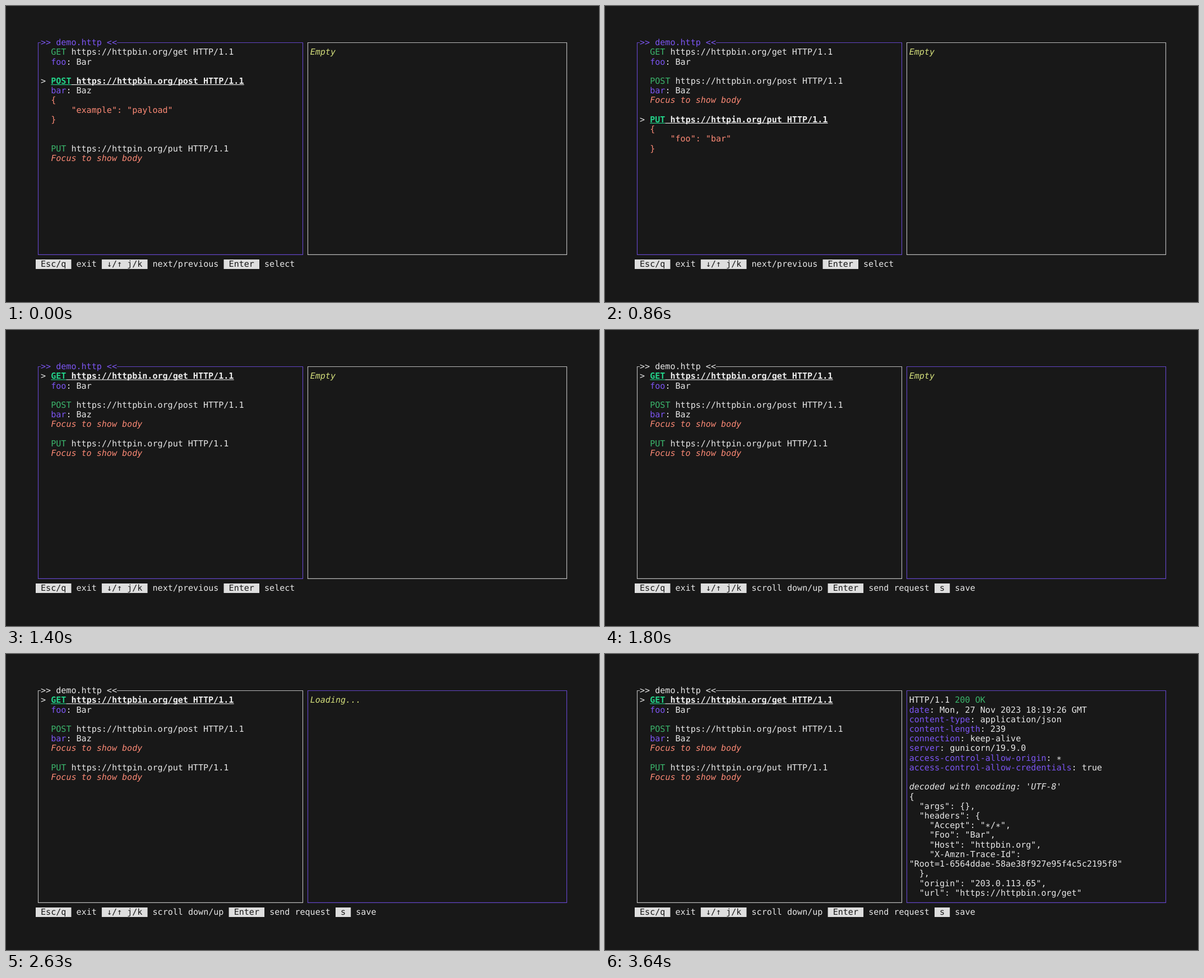
An HTML page for the animation above (4120 ms loop, 1058x529 px).

```html
<!DOCTYPE html>
<html lang="en">
<head>
<meta charset="utf-8">
<title>HTTP client in a terminal</title>
<style>
html, body { margin: 0; width: 100%; height: 100%; overflow: hidden; background: #181818; }
svg { display: block; width: 100%; height: 100%; }
text {
  font: 15.062px "DejaVu Sans Mono", monospace;
  font-variant-ligatures: none;
  text-rendering: geometricPrecision;
  white-space: pre;
  fill: #e8e8e8;
}
.green { fill: #3bb56c; }
.purple { fill: #7c55f3; }
.coral { fill: #fb8975; }
.yellow { fill: #d5e07c; }
.dark { fill: #181818; }
.italic { font-style: italic; }
.bold { font-weight: bold; fill: #efefef; }
.bold.green { fill: #23d48a; }
</style>
</head>
<body>
<svg id="screen" viewBox="0 0 1058 529" xmlns="http://www.w3.org/2000/svg"></svg>
<script>
const screen = document.getElementById('screen');
const LEFT = 53, CELL = 9.068, TOP = 56.9, ROW = 17.225, BASE = 13.2;
const LOOP = 4120;
const ACTIVE = '#6245c4', IDLE = '#b9b9b9';

const scenes = [
  { at: 0, selected: 1 },
  { at: 400, selected: 2 },
  { at: 1160, selected: 1 },
  { at: 1400, selected: 0 },
  { at: 1800, selected: 0, right: true, response: 'empty' },
  { at: 2200, selected: 0, right: true, response: 'loading' },
  { at: 2920, selected: 0, right: true, response: 'done' }
];

const requests = [
  { method: 'GET', url: 'https://httpbin.org/get', header: ['foo', 'Bar'] },
  { method: 'POST', url: 'https://httpbin.org/post', header: ['bar', 'Baz'],
    body: ['{', '    "example": "payload"', '}', ''] },
  { method: 'PUT', url: 'https://httpin.org/put', body: ['{', '    "foo": "bar"', '}'] }
];

const headers = [
  ['date', 'Mon, 27 Nov 2023 18:19:26 GMT'],
  ['content-type', 'application/json'],
  ['content-length', '239'],
  ['connection', 'keep-alive'],
  ['server', 'gunicorn/19.9.0'],
  ['access-control-allow-origin', '*'],
  ['access-control-allow-credentials', 'true']
];

const payload = `{
  "args": {},
  "headers": {
    "Accept": "*/*",
    "Foo": "Bar",
    "Host": "httpbin.org",
    "X-Amzn-Trace-Id":
"Root=1-6564ddae-58ae38f927e95f4c5c2195f8"
  },
  "origin": "203.0.113.65",
  "url": "https://httpbin.org/get"`.split('\n');

const colX = col => LEFT + col * CELL;
const rowY = row => TOP + row * ROW;
const escape = s => s.replace(/&/g, '&amp;').replace(/</g, '&lt;').replace(/>/g, '&gt;');

// Asterisks sit on the middle of the line, as in the terminal font.
const glyphs = s => escape(s).replace(/\*(.?)/g, (m, next) =>
  `<tspan dy="3">*</tspan>` + (next ? `<tspan dy="-3">${next}</tspan>` : ''));

// Each run is [text, classes].
function line(col, row, ...runs) {
  const spans = runs.map(([s, cls = '']) => `<tspan class="${cls}">${glyphs(s)}</tspan>`);
  return `<text x="${colX(col)}" y="${rowY(row) + BASE}">${spans.join('')}</text>`;
}

function underline(col, row, length, color) {
  return `<rect x="${colX(col)}" y="${rowY(row) + BASE + 1}" width="${length * CELL}" height="1.1" fill="${color}"/>`;
}

function stroke(d, color) {
  return `<path d="${d}" fill="none" stroke="${color}" stroke-width="1.2"/>`;
}

function requestPane(selected, focused) {
  const color = focused ? ACTIVE : IDLE;
  const title = '>> demo.http <<';
  let out = stroke(`M${colX(1)} 65.5H57.5V444.3H529.5V65.5H${colX(1 + title.length)}`, color);
  out += line(1, 0, [title, focused ? 'purple' : '']);
  let row = 1;
  requests.forEach(({ method, url, header, body }, i) => {
    const on = i === selected, weight = on ? 'bold' : '';
    const rest = ` ${url} HTTP/1.1`;
    if (on) {
      out += line(1, row, ['>']);
      out += underline(3, row, method.length, '#23d48a');
      out += underline(3 + method.length, row, rest.length, '#efefef');
    }
    out += line(3, row++, [method, weight + ' green'], [rest, weight]);
    if (header) out += line(3, row++, [header[0], 'purple'], [': ' + header[1]]);
    if (body && on) body.forEach(s => { out += line(3, row++, [s, 'coral']); });
    else if (body) out += line(3, row++, ['Focus to show body', 'coral italic']);
    row++;
  });
  return out;
}

function responsePane(state, focused) {
  let out = stroke('M538.5 65.5H1000.5V444.3H538.5Z', focused ? ACTIVE : IDLE);
  if (state !== 'done') {
    const note = state === 'loading' ? 'Loading...' : 'Empty';
    return out + line(54, 1, [note, 'yellow italic']);
  }
  out += line(54, 1, ['HTTP/1.1 '], ['200 OK', 'green']);
  headers.forEach(([key, value], i) => {
    out += line(54, 2 + i, [key, 'purple'], [': ' + value]);
  });
  out += line(54, 10, ["decoded with encoding: 'UTF-8'", 'italic']);
  payload.forEach((s, i) => { out += line(54, 11 + i, [s]); });
  return out;
}

function footer(right) {
  const keys = [['Esc/q', 'exit'], ['↓/↑ j/k', right ? 'scroll down/up' : 'next/previous'],
    ['Enter', right ? 'send request' : 'select']];
  if (right) keys.push(['s', 'save']);
  let col = 0, out = '';
  for (const [key, label] of keys) {
    const width = key.length + 2;
    out += `<rect x="${colX(col)}" y="453" width="${width * CELL}" height="17" fill="#dedede"/>`;
    out += line(col + 1, 23, [key, 'dark']) + line(col + width + 1, 23, [label]);
    col += width + label.length + 2;
  }
  return out;
}

let shown;
function draw(ms) {
  const scene = scenes.findLast(s => s.at <= ms);
  if (scene === shown) return;
  shown = scene;
  const { selected, right, response } = scene;
  screen.innerHTML = '<rect width="1058" height="529" fill="#181818"/>' +
    requestPane(selected, !right) + responsePane(response, right) + footer(right);
}

const start = performance.now();
function tick() {
  draw((performance.now() - start) % LOOP);
  requestAnimationFrame(tick);
}
tick();
</script>
</body>
</html>
```
